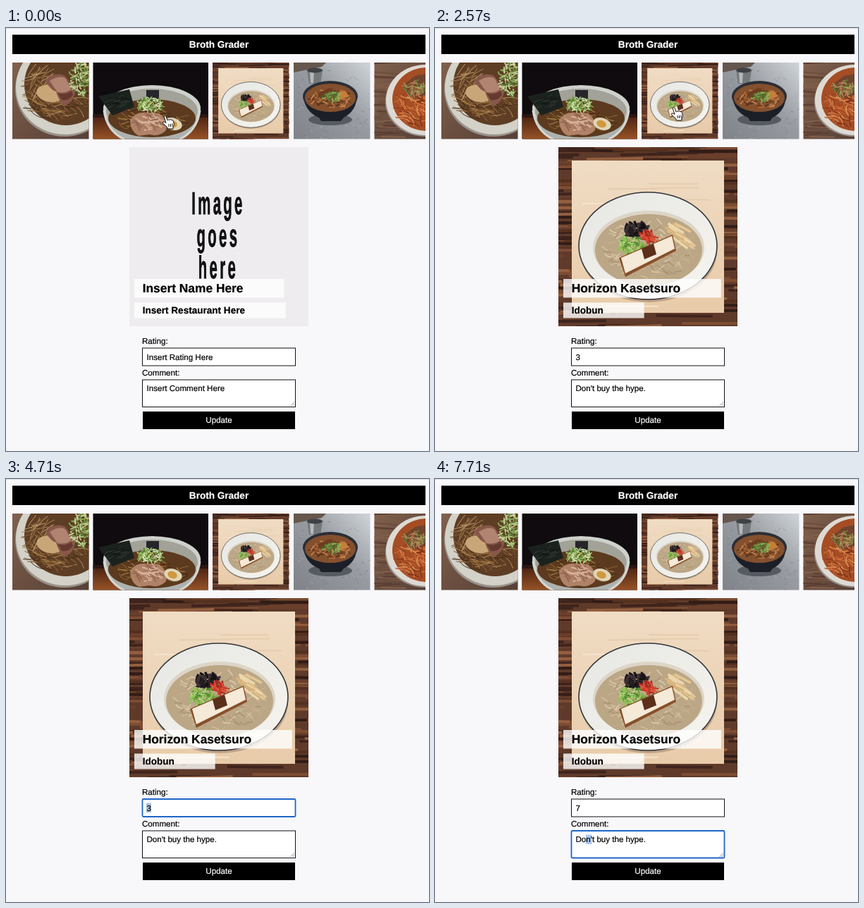
Recreate the animation shown at these times as an HTML page. Size 600 by 600 pixels, loop 8000 ms.

```html
<!DOCTYPE html>
<html lang="en">
<head>
<meta charset="utf-8">
<title>Broth Grader</title>
<style>
  html, body { margin: 0; width: 100%; height: 100%; overflow: hidden; background: #f8f6fa; }
  #stage { display: block; width: 100vw; height: 100vh; font: 11.58px "Liberation Sans", Arial, sans-serif; }
  text { stroke: #000; stroke-width: .2; text-rendering: geometricPrecision; }
  .light { fill: #fff; stroke: #fff; }
  .bold { font-weight: bold; font-size: 13.55px; }
  .name { font-size: 17.38px; }
  .poster { font-weight: bold; font-size: 45px; letter-spacing: 7.5px; fill: #111; }
  .poster text { vector-effect: non-scaling-stroke; stroke-width: .8; }
  .field { fill: #fff; stroke: #111; }
  .focus { stroke: #1d66c9; stroke-width: 1.8; }
</style>
</head>
<body>
<svg id="stage" viewBox="0 0 600 600">
  <defs>
    <linearGradient id="stone" x1="0" y1="1" x2="1" y2="0">
      <stop stop-color="#7f8389"/><stop offset=".55" stop-color="#989ca2"/><stop offset="1" stop-color="#d0d5d9"/>
    </linearGradient>
    <linearGradient id="board" x2="0" y2="1">
      <stop stop-color="#f0dcc4"/><stop offset="1" stop-color="#e8cba9"/>
    </linearGradient>
    <linearGradient id="wood" x2="1" y2="1">
      <stop stop-color="#80604d"/><stop offset="1" stop-color="#564036"/>
    </linearGradient>
    <linearGradient id="table" x2="0" y2="1">
      <stop stop-color="#4d2413"/><stop offset="1" stop-color="#985326"/>
    </linearGradient>
    <linearGradient id="rim" x2="1" y2="1">
      <stop stop-color="#e6e7e4"/><stop offset="1" stop-color="#f6f4ee"/>
    </linearGradient>

    <!-- data-strands: count cx cy rx ry length width tilt spread -->
    <symbol id="ramen" viewBox="175 169 254 254">
      <path fill="#5f3a2a" d="M175 169h254v254H175z"/>
      <g data-strands="260 302 296 185 185 80 4 0 .02" data-colors="#3f241c #7d4c32 #54301f #935f3f #321c16 #6b3f2b"/>
      <path fill="url(#board)" d="M194 188h216v216H194z"/>
      <g data-strands="22 302 295 68 105 70 2 0 .02" data-colors="#e6cdae #f4e3cd"/>
      <ellipse cx="303" cy="316" rx="97" ry="73" fill="#bda387"/>
      <ellipse cx="302" cy="309" rx="98" ry="76" fill="url(#rim)" stroke="#34353a" stroke-width="1.6"/>
      <ellipse cx="303" cy="312" rx="79" ry="53" fill="#dcd5c7"/>
      <ellipse cx="303" cy="315" rx="76" ry="51" fill="#bba686"/>
      <g data-strands="120 303 314 66 42 11 1.6 0 .9" data-colors="#d3bf9d #c6b08c #ab9472 #dccbae"/>
      <g data-strands="14 347 294 16 13 26 3.5 .6 .15" data-colors="#e4c793 #d6b37c #ecd6ab"/>
      <g data-strands="42 286 287 18 9 10 3.5 0 1.5" data-colors="#241d20 #3d3034 #151215"/>
      <g data-strands="26 302 297 9 9 13 2 .8 .7" data-colors="#c93927 #e05238 #a82920"/>
      <g data-strands="90 279 309 18 14 7 2 0 1.5" data-colors="#72a83c #94c25a #4e8630 #b0d27c"/>
      <path fill="#87502a" d="M261 326l76-33 5 23-72 37z"/>
      <path fill="#f5e9d7" d="M264 326l72-31 4 18-70 35z"/>
      <path fill="#5c2f1b" d="M293 313l17-7 4 15-17 7z"/>
    </symbol>
  </defs>

  <path fill="#f8f7fa" d="M0 0h600v600H0z"/>
  <path fill="#dedce0" d="M0 0h600v1H0z"/>
  <path d="M9 9.5h586V37H9z"/>
  <text class="bold light" x="302" y="27.6" text-anchor="middle">Broth Grader</text>

  <svg x="9" y="49" width="108.5" height="108.5" viewBox="9 49 108.5 108.5">
    <path fill="url(#wood)" d="M9 49h109v109H9z"/>
    <ellipse cx="83" cy="87" rx="70" ry="67" fill="#98928a"/>
    <ellipse cx="84" cy="84" rx="70" ry="67" fill="#d3d1c8"/>
    <ellipse cx="85" cy="80" rx="59" ry="58" fill="#5d3d24"/>
    <g data-strands="90 76 104 45 26 22 1 .4 .7" data-colors="#9c7040 #7d5730 #b88d58 #684526 #3d2716"/>
    <g data-strands="34 47 76 17 22 20 1 -.7 .6" data-colors="#a98352 #7d5a34 #bf9c6b"/>
    <ellipse cx="62" cy="93" rx="19" ry="12" fill="#c9a678" transform="rotate(12 62 93)"/>
    <path fill="#86574a" d="M55 74q16-13 29-6l15 21q-3 16-16 22-9-9-12-21-7-1-16-16z"/>
    <path fill="#b18472" d="M62 75q15-9 23-3l7 15q-7 6-19 4z"/>
    <path fill="#66392f" d="M73 92q11 4 20-3l2 6q-7 9-16 7z"/>
    <g data-strands="80 106 71 14 25 8 1.8 .5 1.2" data-colors="#8aa857 #b3c77d #5d7d39 #cad59e"/>
  </svg>

  <svg x="123.5" y="49" width="163.5" height="108.5" viewBox="123.5 49 163.5 108.5">
    <path fill="#0f0b0e" d="M123 49h165v109H123z"/>
    <path fill="url(#table)" d="M123 126h165v32H123z"/>
    <path fill="#2a1612" d="M123 122h165v5H123z"/>
    <path fill="#aeb2ae" d="M138 113h138q-3 34-28 45h-82q-26-12-28-45z"/>
    <ellipse cx="207" cy="114" rx="69" ry="33" fill="#ced1cb"/>
    <ellipse cx="207" cy="118" rx="65" ry="32" fill="#a3a299"/>
    <ellipse cx="207" cy="128" rx="62" ry="27" fill="#5b3a1f"/>
    <g data-strands="60 207 131 50 17 14 1.2 0 .8" data-colors="#86602f #472a14 #a57c48 #6b4522"/>
    <path fill="#26262a" d="M199 88h18v15h-18z"/>
    <path fill="#1b221e" d="M131 97l44-10 7 25-31 12z"/>
    <g data-strands="30 157 105 16 9 10 1 -.3 .3" data-colors="#303b34 #121815"/>
    <path fill="#b08368" d="M176 131q7-12 20-11l21 1q13 9 10 24-9 10-24 6l-14 2q-12-5-13-22z"/>
    <g data-strands="50 202 134 19 11 11 1.6 .4 .7" data-colors="#cda58a #8f6250 #dbb8a0 #a17158"/>
    <g data-strands="75 205 109 18 9 8 1.4 0 1.5" data-colors="#8cb452 #b7d588 #5c8a37 #d8e7b9"/>
    <ellipse cx="237" cy="136" rx="13" ry="8.500" fill="#e0d5b8" transform="rotate(18 237 136)"/>
    <ellipse cx="236" cy="136" rx="7" ry="5" fill="#d0983f" transform="rotate(18 236 136)"/>
    <path d="M139 117q4 29 29 41M275 117q-4 29-29 41" fill="none" stroke="#d3d6d1" stroke-width="3"/>
  </svg>

  <use href="#ramen" x="293" y="49" width="108.5" height="108.5"/>

  <svg x="408" y="49" width="108.5" height="108.5" viewBox="408 49 108.5 108.5">
    <path fill="url(#stone)" d="M408 49h109v109H408z"/>
    <path fill="#66564d" d="M408 49h46l-6 6-40 8z"/>
    <g data-strands="140 462 112 65 55 4 .8 .2 .6" data-colors="#7c8086 #a5a9ad #8f9399"/>
    <path fill="#74787b" d="M427 60h22l-3 19h-16z"/>
    <path fill="#b5b8b9" d="M431 61h6l-1 17h-4z"/>
    <ellipse cx="438" cy="60" rx="11" ry="3.5" fill="#3f4245"/>
    <ellipse cx="460" cy="130" rx="31" ry="8" fill="#565a61"/>
    <path fill="#1c1f27" d="M421 96q4 24 23 31l3 5h28l4-5q18-9 19-31z"/>
    <ellipse cx="460" cy="97" rx="39" ry="22" fill="#2b2e36"/>
    <ellipse cx="460" cy="99" rx="36" ry="20" fill="#84502e"/>
    <g data-strands="80 460 100 28 14 8 1.8 0 1" data-colors="#ad6d3b #734122 #c18550 #58301b"/>
    <path fill="#6d3d20" d="M442 93l16-8 11 6-4 7-18 3z"/>
    <path fill="#c77e38" d="M469 91l12-2 6 8-13 4z"/>
    <g data-strands="45 463 98 13 7 6 1.5 0 1.5" data-colors="#6f9140 #93b35b #4b6c2c"/>
  </svg>

  <svg x="522.5" y="49" width="72.5" height="108.5" viewBox="522.5 49 72.5 108.5">
    <path fill="url(#wood)" d="M522 49h74v109h-74z"/>
    <g data-strands="40 540 103 24 62 35 2 0 .1" data-colors="#6e4d3c #825f4c #5b3e31"/>
    <ellipse cx="595" cy="105" rx="57" ry="49" fill="#978f88"/>
    <ellipse cx="595" cy="102" rx="56" ry="50" fill="#dedad3"/>
    <ellipse cx="596" cy="101" rx="48" ry="45" fill="#a54d25"/>
    <g data-strands="90 583 112 27 28 15 1.4 .6 .9" data-colors="#cf7038 #97401d #dc9457 #b85a2e #7a2f18"/>
    <path fill="#70442e" d="M562 82l18-14 16-3v30l-21 5z"/>
    <g data-strands="55 579 86 15 12 7 1.6 0 1.5" data-colors="#8d603b #9ca35a #b98355 #667c38"/>
  </svg>

  <g id="placeholder">
    <path fill="#eeecef" d="M175 169h254v254H175z"/>
    <g class="poster" text-anchor="middle" transform="translate(301 264) scale(.45 1)">
      <text>Image</text><text y="46">goes</text><text y="91">here</text>
    </g>
  </g>
  <use id="photo" href="#ramen" x="175" y="169" width="254" height="254"/>

  <g fill="#fff" fill-opacity=".8">
    <rect id="nameBar" x="182" y="356" height="26.5"/>
    <rect id="placeBar" x="182" y="389.5" height="22"/>
  </g>
  <text id="name" class="bold name" x="193.7" y="375.2"/>
  <text id="place" class="bold" x="193.7" y="405"/>

  <text x="193" y="447.6">Rating:</text>
  <rect id="ratingBox" class="field" x="193.5" y="454" width="217" height="25"/>
  <path id="ratingMark" fill="#a9c4e4" d="M199 459.5h7V473h-7z"/>
  <text id="rating" x="199.5" y="470.5"/>
  <path id="caret" stroke="#111" d="M206.5 460v13"/>

  <text x="193" y="493">Comment:</text>
  <rect id="commentBox" class="field" x="193.5" y="499" width="217" height="38.5"/>
  <path id="commentMark" fill="#abcaf3" d="M214 504.5h8.500V518H214z"/>
  <text id="comment" x="199.5" y="515.3"/>
  <path stroke="#777" stroke-width=".8" d="M403.5 536l5.500-5.500M406.500 536l2.500-2.500"/>
  <path d="M194 544h216v25H194z"/>
  <text class="light" x="302" y="560.2" text-anchor="middle">Update</text>

  <g id="pointer">
    <path id="hand" fill="#fff" stroke="#111" stroke-linejoin="round"
      d="M-1 1.500Q.5-.5 2 1.500L4 7Q5.500 5 7 6.500 8.500 5 10 6.500 12 6 12.500 8.500L13.500 13 12 16v3H4.500L3.500 16.500-2.500 11Q-3 8.500-.5 9L2 10.500ZM6 12v4M8.500 12v4M11 11.500v4"/>
    <path id="arrow" stroke="#fff" d="M0 0v14l3.300-3 2.200 5 2.300-1-2.200-4.800H10z"/>
    <g id="beam" fill="none">
      <path stroke="#fff" stroke-width="3" d="M-3.500-7.500Q0-7.500 0-5V5.500Q0 8-3.500 8M3.500-7.500Q0-7.500 0-5V5.500Q0 8 3.500 8"/>
      <path stroke="#111" stroke-width="1.2" d="M-3.500-7.500Q0-7.500 0-5V5.500Q0 8-3.500 8M3.500-7.500Q0-7.500 0-5V5.500Q0 8 3.500 8M-2 3h4"/>
    </g>
  </g>
</svg>
<script>
  const LOOP = 8000, STEPS_PER_SECOND = 7;
  const el = id => document.getElementById(id);
  const show = (id, on) => { el(id).style.display = on ? "" : "none"; };

  // Seeded random strands: noodles, herbs, wood grain
  let seed = 11;
  const random = () => (seed = seed * 16807 % 2147483647) / 2147483647;
  for (const group of document.querySelectorAll("[data-strands]")) {
    const [count, cx, cy, rx, ry, length, width, tilt, spread] = group.dataset.strands.split(" ").map(Number);
    const colors = group.dataset.colors.split(" ");
    let paths = "";
    for (let i = 0; i < count; i++) {
      const around = random() * 2 * Math.PI, radius = Math.sqrt(random());
      const x = cx + Math.cos(around) * rx * radius, y = cy + Math.sin(around) * ry * radius;
      const angle = tilt + (random() * 2 - 1) * spread;
      const dx = Math.cos(angle) * length / 2, dy = Math.sin(angle) * length / 2;
      const bend = (random() - .5) * spread * length * .6;
      paths += `<path stroke="${colors[i % colors.length]}" d="M${x - dx} ${y - dy}Q${x + bend} ${y - bend} ${x + dx} ${y + dy}"/>`;
    }
    group.setAttribute("fill", "none");
    group.setAttribute("stroke-width", width);
    group.innerHTML = paths;
  }

  // Pointer track: step, x, y
  const track = [
    [0, 225, 124], [11, 229, 127], [14, 229, 127], [17, 338, 112], [20, 338, 112],
    [23, 238, 457], [24, 238, 459], [28, 207, 466], [41, 207, 466],
    [46, 228, 505], [48, 228, 505], [52, 219, 511], [56, 219, 511]
  ];

  function pointerAt(step) {
    const i = track.findIndex(key => key[0] > step);
    const [t0, x0, y0] = track[i - 1], [t1, x1, y1] = track[i];
    const p = (step - t0) / (t1 - t0), ease = p * p * (3 - 2 * p);
    return [x0 + (x1 - x0) * ease, y0 + (y1 - y0) * ease];
  }

  function label(id, text) {
    el(id).textContent = text;
    el(id + "Bar").setAttribute("width", el(id).getComputedTextLength() + 69.5);
  }

  function focus(id, on) {
    el(id).classList.toggle("focus", on);
    el(id).setAttribute("rx", on ? 1.5 : 0);
  }

  function draw(now) {
    const step = Math.floor((now % LOOP + 3) * STEPS_PER_SECOND / 1000) % 56;
    const chosen = step >= 18;

    show("placeholder", !chosen);
    show("photo", chosen);
    label("name", chosen ? "Horizon Kasetsuro" : "Insert Name Here");
    label("place", chosen ? "Idobun" : "Insert Restaurant Here");

    el("rating").textContent = !chosen ? "Insert Rating Here" : step < 37 ? "3" : "7";
    el("comment").textContent = chosen ? "Don't buy the hype." : "Insert Comment Here";
    focus("ratingBox", step >= 28 && step < 46);
    focus("commentBox", step >= 46);
    show("ratingMark", step >= 30 && step < 37);
    show("caret", step >= 37 && step < 46 && step % 7 > 1);
    show("commentMark", step >= 53);

    const [x, y] = pointerAt(step);
    el("pointer").setAttribute("transform", `translate(${x} ${y})`);
    show("pointer", step < 30 || step >= 41 && step < 53);
    show("hand", y < 157);
    show("arrow", y >= 157 && y < 436);
    show("beam", y >= 436);
  }

  function tick() {
    draw(performance.now());
    requestAnimationFrame(tick);
  }
  tick();
</script>
</body>
</html>
```
